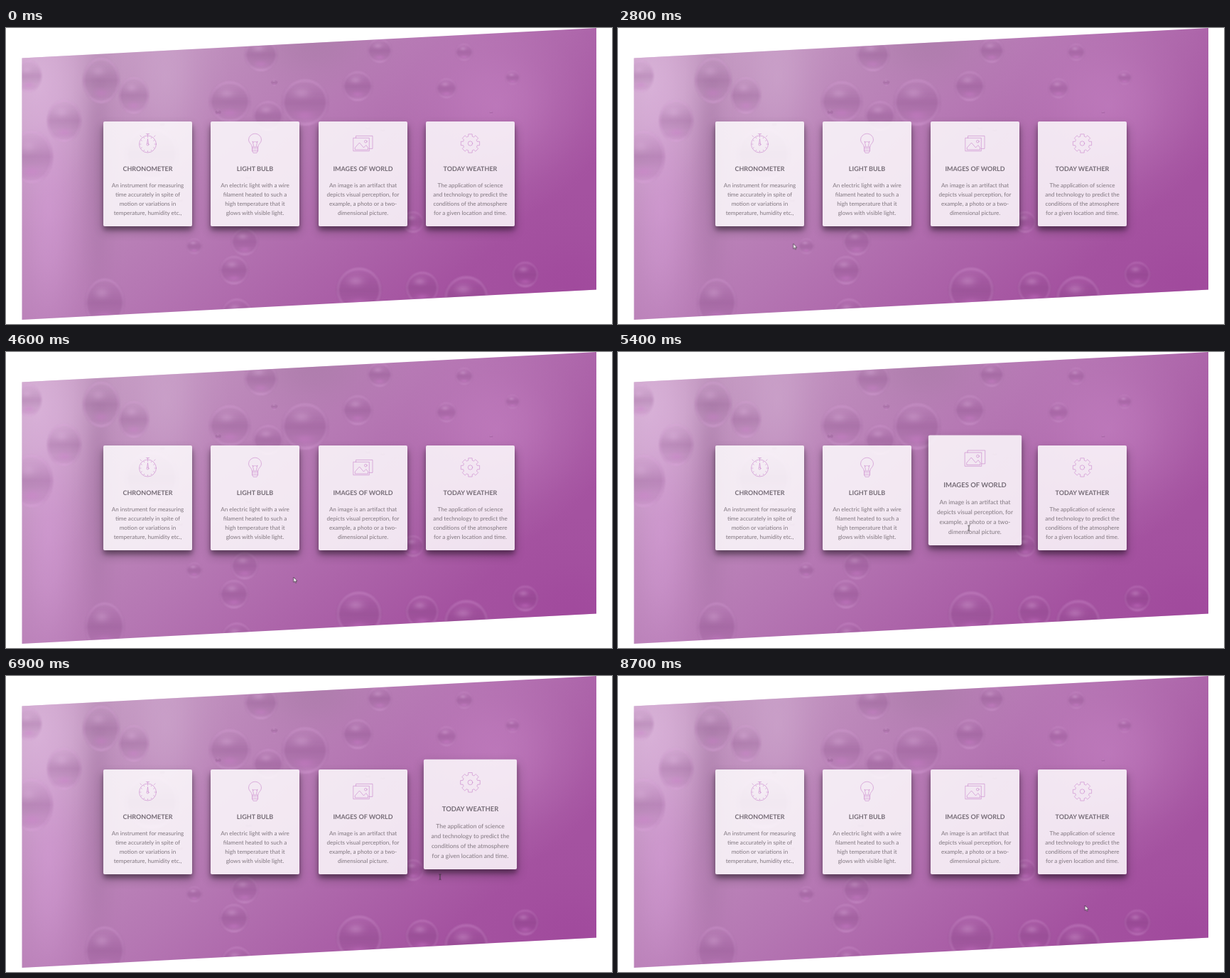
Animation, 853 px wide and 418 px high, one loop 9000 ms. Source, as an HTML page with a canvas:

```html
<!DOCTYPE html>
<html lang="en">
<head>
<meta charset="utf-8">
<title>Feature cards</title>
<style>
  html, body { margin: 0; width: 100%; height: 100%; overflow: hidden; background: #fff; }
  #stage { position: relative; width: 853px; height: 418px; overflow: hidden; }
  canvas { position: absolute; left: 0; top: 0; }
  .card {
    position: absolute; top: 132px; width: 125px; height: 147.5px;
    border-radius: 2px; background: rgba(255, 255, 255, .83);
    box-shadow: 0 7px 14px rgba(0, 0, 0, .3), 0 5px 6px rgba(0, 0, 0, .3);
  }
  .card svg { position: absolute; left: 0; top: 0; width: 125px; height: 147.5px; overflow: visible; }
  text { font-family: Lato, sans-serif; text-anchor: middle; text-rendering: geometricPrecision; }
  .title { font-size: 9px; font-weight: 700; fill: #756c76; }
  .copy { font-size: 8.1px; fill: #80777f; }
  .icon { fill: none; stroke: #c47cc8; stroke-width: .55; stroke-linejoin: round; stroke-linecap: round; }
  #cursor { position: absolute; left: 0; top: 0; width: 1px; height: 1px; overflow: visible; }
</style>
</head>
<body>
<div id="stage">
  <canvas id="scene" width="853" height="418"></canvas>
  <svg id="cursor">
    <path id="arrow" d="M0 0V7.2L1.7 5.7 2.8 8.2 4 7.7 2.9 5.3H5Z" fill="#fff" stroke="#3a2f3a" stroke-width=".7"/>
    <path id="beam" d="M-1.5-3.8Q0-3.8 0-3 0-3.8 1.5-3.8M0-3V3M-1.5 3.8Q0 3.8 0 3 0 3.8 1.5 3.8" fill="none" stroke="#333" stroke-width=".9"/>
  </svg>
</div>
<script>
const LOOP = 9000, STEP = 100, FADE = 300;
const $ = id => document.getElementById(id);

// ---------- backdrop ----------
const ctx = $('scene').getContext('2d');

function shade(gradient, colors) {
  colors.forEach((c, i) => gradient.addColorStop(i / (colors.length - 1), c));
  return gradient;
}

function glow(x, y, rx, ry, rgb, a) {
  ctx.save();
  ctx.translate(x, y);
  ctx.scale(rx, ry);
  ctx.fillStyle = shade(ctx.createRadialGradient(0, 0, 0, 0, 0, 1),
    [1, .75, .35, .1, 0].map(k => `rgba(${rgb},${a * k})`));
  ctx.fillRect(-1, -1, 2, 2);
  ctx.restore();
}

function bubble(x, y, r) {
  const ry = x < 200 ? r * 1.25 : r;
  const pale = a => `rgba(226,170,226,${a})`, dark = a => `rgba(125,65,125,${a})`;
  const outline = k => { ctx.beginPath(); ctx.ellipse(x, y, r * k, ry * k, 0, 0, 7); };
  ctx.filter = `blur(${Math.min(1.2, r / 10)}px)`;
  ctx.fillStyle = shade(ctx.createLinearGradient(x, y - ry, x, y + ry),
    [pale(.12), dark(.1), dark(.26), dark(.12), pale(.3)]);
  outline(1);
  ctx.fill();
  ctx.strokeStyle = pale(.2);
  ctx.lineWidth = r / 9;
  outline(.93);
  ctx.stroke();
  ctx.filter = 'none';
  glow(x - r * .15, y - ry * .4, r * .65, ry * .4, '228,185,228', .28);
  glow(x, y + ry * .55, r * .7, ry * .35, '215,125,213', .28);
}

function seeded(seed) {
  return () => (seed = seed * 16807 % 2147483647) / 2147483647;
}

function paintScene() {
  ctx.beginPath();
  [[22.5, 42.5], [831, 0], [831, 369.5], [22.5, 412]].forEach(p => ctx.lineTo(...p));
  ctx.clip();
  ctx.fillStyle = shade(ctx.createLinearGradient(200, 0, 560, 420), ['#c398c1', '#b577b3', '#a452a0']);
  ctx.fillRect(0, 0, 853, 418);

  glow(45, 80, 120, 210, '230,196,230', .6);
  glow(60, 260, 70, 280, '218,160,220', .5);
  glow(130, 190, 40, 290, '146,100,146', .36);
  glow(225, 70, 90, 180, '212,176,212', .45);
  glow(430, 20, 140, 90, '158,116,156', .4);
  glow(690, 110, 170, 160, '206,140,204', .45);
  glow(800, 370, 180, 140, '156,62,152', .4);

  const bubbles = [
    [134, 74, 26], [180, 95, 21], [82, 131, 24], [32, 68, 18], [36, 182, 30], [315, 104, 29], [421, 105, 33],
    [369, 124, 21], [359, 38, 23], [495, 82, 21], [526, 32, 17], [620, 85, 14], [645, 34, 12], [713, 70, 10],
    [205, 178, 38], [336, 302, 19], [321, 342, 20], [139, 388, 28], [325, 403, 21], [497, 370, 32],
    [586, 367, 23], [648, 381, 31], [731, 348, 18], [265, 308, 11], [573, 274, 15]
  ];
  bubbles.forEach(b => bubble(...b));

  const random = seeded(11);
  for (let i = 0; i < 8; i++) bubble(220 + random() * 560, 20 + random() * 260, 2 + random() * 4);
}
paintScene();

// ---------- icons ----------
const point = (r, a) => `${(r * Math.cos(a)).toFixed(2)} ${(r * Math.sin(a)).toFixed(2)}`;

function gear() {
  const outline = [];
  for (let i = 0; i < 8; i++) {
    const a = i * Math.PI / 4;
    outline.push(point(10.3, a - .27), point(13.4, a - .2), point(13.4, a + .2), point(10.3, a + .27));
  }
  return `<path d="M${outline.join('L')}Z"/><circle r="3.2"/>`;
}

function clock() {
  let ticks = '';
  for (let i = 0; i < 12; i++) {
    const a = i * Math.PI / 6;
    ticks += `M${point(9.6, a)}L${point(10.8, a)}`;
  }
  return `<circle cy="1" r="12"/><path transform="translate(0 1)" d="${ticks}"/>
    <path d="M-2.2-13.4H2.2M0-13.4V-11M9-9.5L10.5-11M-9-9.5L-10.5-11M0-6L-1 .2M0-6L1 .2"/><circle cy="1.5" r="1.5"/>`;
}

const bulb = `<path d="M-4 5C-4 1-9-.5-9-5A9 8.8 0 0 1 9-5C9-.5 4 1 4 5Z"/>
  <path d="M-4 5V10.5L-2.5 13.3H2.5L4 10.5V5M-4 7.8H4M-4 10.5H4M-1.5 5L-3.5-3 -1.5-1.5 0-3 1.5-1.5 3.5-3 1.5 5"/>`;

const pictures = `<path d="M-13.3-7.7H8.8V10.7H-13.3ZM-10-7.7V-10.6H13.5V7.4H8.8"/>
  <path d="M-11.2 8.5V6L-5-1 1 6 4.3 2.5 7 6V8.5Z"/><circle cx="3.8" cy="-2.8" r="1.8"/>`;

// ---------- cards ----------
const cards = [
  { icon: clock(), title: 'CHRONOMETER', hover: [1786, 2450],
    copy: ['An instrument for measuring', 'time accurately in spite of', 'motion or variations in', 'temperature, humidity etc.,'] },
  { icon: bulb, title: 'LIGHT BULB', hover: [3534, 4000],
    copy: ['An electric light with a wire', 'filament heated to such a', 'high temperature that it', 'glows with visible light.'] },
  { icon: pictures, title: 'IMAGES OF WORLD', hover: [5100, 6065],
    copy: ['An image is an artifact that', 'depicts visual perception, for', 'example, a photo or a two-', 'dimensional picture.'] },
  { icon: gear(), title: 'TODAY WEATHER', hover: [6650, 7625],
    copy: ['The application of science', 'and technology to predict the', 'conditions of the atmosphere', 'for a given location and time.'] }
];

const motions = [];
function move(el, frames) {
  const motion = el.animate(frames, { duration: LOOP, iterations: Infinity });
  motion.pause();
  motions.push(motion);
}

cards.forEach((card, i) => {
  const el = document.createElement('div');
  el.className = 'card';
  el.style.left = 137.3 + i * 151.1 + 'px';
  const lines = card.copy.map((line, n) => `<text class="copy" x="62.5" y="${92.5 + n * 13.3}">${line}</text>`).join('');
  el.innerHTML = `<svg><g class="icon" transform="translate(62.5 31)">${card.icon}</g>
    <text class="title" x="62.5" y="69.6">${card.title}</text>${lines}</svg>`;
  $('stage').insertBefore(el, $('cursor'));

  const rest = 'translateY(0px) scale(1)', lifted = 'translateY(-10.8px) scale(1.05)';
  const [enter, leave] = card.hover;
  const key = (t, transform, easing = 'linear') => ({ offset: t / LOOP, transform, easing });
  move(el, [key(0, rest), key(enter, rest, 'ease'), key(enter + FADE, lifted),
            key(leave, lifted, 'ease'), key(leave + FADE, rest), key(LOOP, rest)]);
});

// ---------- pointer: time, x, y ----------
const path = [
  [600, 100, 380], [1900, 178, 253], [3000, 262, 316], [3600, 322, 260.5], [4600, 404.8, 318], [5500, 505, 240],
  [6200, 567, 321.5], [7300, 636, 262], [7600, 636, 262], [7700, 637, 291], [8600, 657.3, 324]
];
const at = (t, x, y) => ({ offset: t / LOOP, transform: `translate(${x}px, ${y}px)` });
const [, x0, y0] = path[0], [, x1, y1] = path[path.length - 1];
move($('cursor'), [at(0, x0, y0), ...path.map(p => at(...p)), at(LOOP, x1, y1)]);

const start = performance.now();

function frame() {
  const t = Math.floor((performance.now() - start) % LOOP / STEP) * STEP;
  motions.forEach(m => { m.currentTime = t; });
  const overCard = cards.some(({ hover: [enter, leave] }) => t >= enter && t < leave);
  $('cursor').style.visibility = t < path[0][0] ? 'hidden' : 'visible';
  $('beam').style.display = overCard ? '' : 'none';
  $('arrow').style.display = overCard ? 'none' : '';
  requestAnimationFrame(frame);
}
frame();
</script>
</body>
</html>
```
